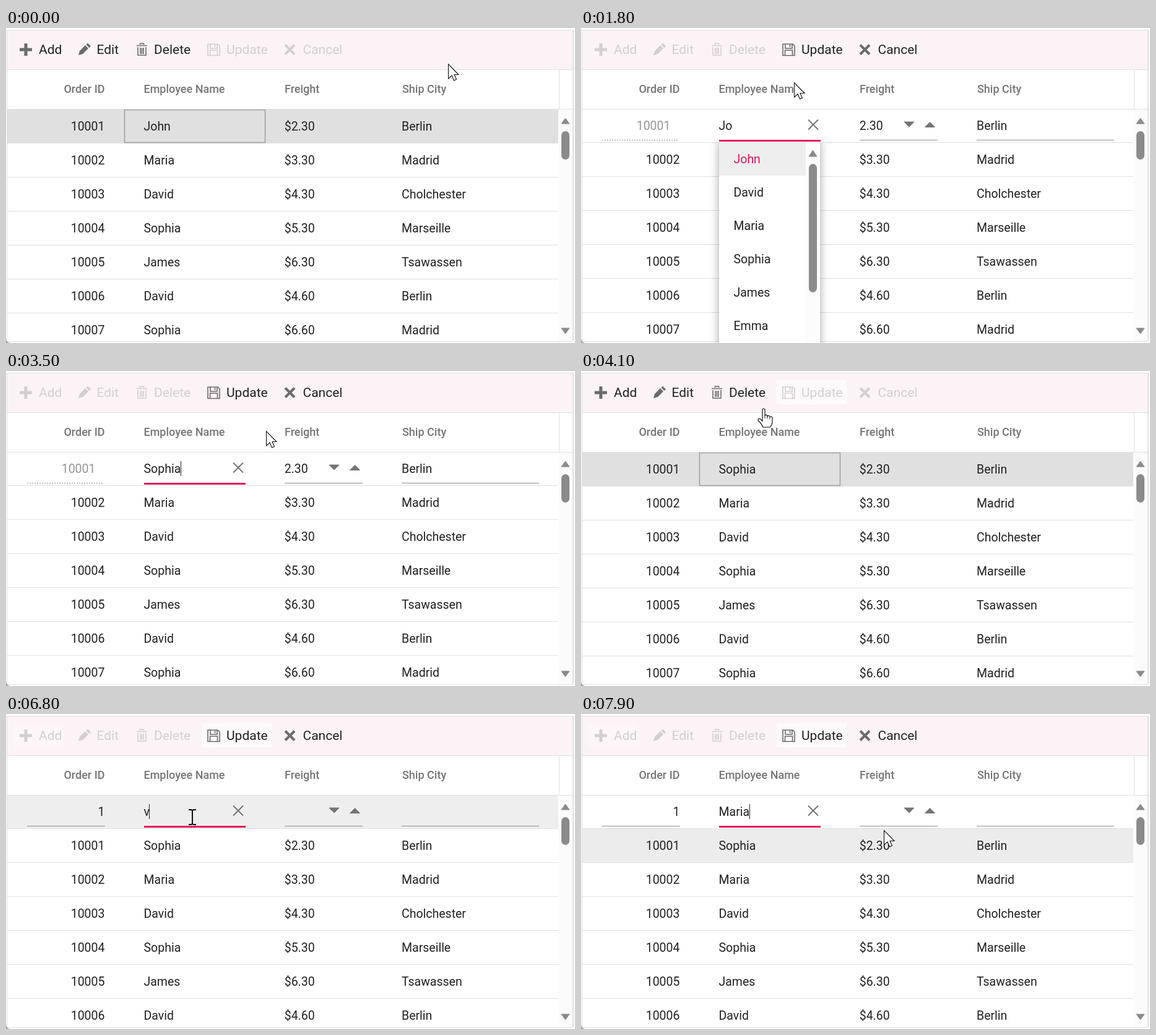
An HTML page with a canvas that plays this animation: 919x510 px, repeating every 8 s.

```html
<!DOCTYPE html>
<html lang="en">
<head>
<meta charset="utf-8">
<title>Editable grid</title>
<style>
html, body { margin: 0; width: 100%; height: 100%; overflow: hidden; background: #fff; }
canvas { display: block; }
</style>
</head>
<body>
<canvas id="stage" width="919" height="510"></canvas>
<script>
const ctx = document.getElementById('stage').getContext('2d');
const LOOP = 8000;
const PINK = '#e3165b', INK = '#212121', ICON = '#6b6b6b', OFF = '#d3cfd1', LINE = '#e0e0e0', THUMB = '#8b8b8b';
const COLUMN = { id: 159.5, name: 222.5, freight: 449.7, city: 639 };
const NAMES = ['John', 'Maria', 'David', 'Sophia', 'James', 'David', 'Sophia'];
const PRICES = ['2.30', '3.30', '4.30', '5.30', '6.30', '4.60', '6.60'];
const CITIES = ['Berlin', 'Madrid', 'Cholchester', 'Marseille', 'Tsawassen', 'Berlin', 'Madrid'];
const OPTIONS = ['John', 'David', 'Maria', 'Sophia', 'James', 'Emma'];

// Pointer stops: time, hotspot x and y, shape from then on
const POINTER = [
  [0, 714, 58, 'arrow'], [100, 640, 72, 'arrow'], [300, 330, 140, 'arrow'], [500, 177, 171, 'arrow'],
  [700, 177, 171, 'arrow'], [1000, 310, 155, 'beam'], [1100, 310, 155, 'beam'], [1200, 344, 88, 'arrow'],
  [2500, 344, 88, 'arrow'], [2600, 335, 190, 'hand'], [2800, 306, 335, 'hand'], [3000, 303, 366, 'hand'],
  [3200, 303, 366, 'hand'], [3300, 315, 330, 'arrow'], [3500, 420, 97, 'arrow'], [3600, 396, 60, 'arrow'],
  [3700, 380, 46, 'hand'], [4000, 380, 46, 'hand'], [4200, 210, 76, 'arrow'], [4400, 46, 50, 'hand'],
  [4600, 44, 48, 'arrow'], [4700, 44, 48, 'arrow'], [4900, 88, 97, 'arrow'], [5300, 88, 97, 'arrow'],
  [5500, 200, 76, 'arrow'], [5700, 301, 167, 'beam'], [6900, 301, 167, 'beam'], [7000, 302, 200, 'hand'],
  [7300, 306, 332, 'hand'], [7700, 306, 332, 'hand'], [7800, 400, 255, 'arrow'], [7900, 489, 188, 'arrow']
];
const EDIT_TEXT = [[700, 'John'], [1600, 'Joh'], [1800, 'Jo'], [2000, 'J'], [3200, 'Sophia'],
  [4600, ''], [6800, 'v'], [7700, 'Maria']];

const within = (t, a, b) => t >= a && t < b;
const latest = (steps, t) => steps.filter(s => s[0] <= t).pop();

function pointerAt(t) {
  const i = POINTER.filter(p => p[0] <= t).length - 1;
  const a = POINTER[i], b = POINTER[i + 1] || a;
  const k = b === a ? 0 : (t - a[0]) / (b[0] - a[0]);
  return { x: Math.round(a[1] + (b[1] - a[1]) * k), y: Math.round(a[2] + (b[2] - a[2]) * k), shape: a[3] };
}

function rect(x, y, w, h, color) {
  ctx.fillStyle = color;
  ctx.fillRect(x, y, w, h);
}

function pill(x, y, w, h, color, r = w / 2) {
  ctx.fillStyle = color;
  ctx.beginPath();
  ctx.roundRect(x, y, w, h, r);
  ctx.fill();
}

function text(s, x, y, color = INK, size = 19.5, weight = 400, align = 'left') {
  ctx.font = `${weight} ${size}px Roboto, sans-serif`;
  ctx.textAlign = align;
  ctx.fillStyle = color;
  ctx.fillText(s, x, y);
}

function shape(d, fill, stroke, width = 1, x = 0, y = 0) {
  const path = new Path2D(d);
  ctx.save();
  ctx.translate(x, y);
  if (fill) { ctx.fillStyle = fill; ctx.fill(path); }
  if (stroke) { ctx.strokeStyle = stroke; ctx.lineWidth = width; ctx.stroke(path); }
  ctx.restore();
}

// Triangle with its flat side at y and its tip at y + h
function triangle(x, y, w, h, color) {
  shape(`M${x} ${y}h${w}l${-w / 2} ${h}z`, color, color, 1);
}

function toolbar(t, busy) {
  rect(2, 4, 913, 63, '#fcf3f6');
  rect(0, 3, 916, 1, LINE);
  rect(2, 67, 913, 1, LINE);
  if (t >= 3700) pill(316, 15, 113, 39, '#fefafc', 3);
  if (t >= 4300) pill(12, 15, 80, 39, '#fdf6f8', 3);
  const a = busy ? OFF : ICON, b = busy ? ICON : OFF;
  const labelA = busy ? OFF : INK, labelB = busy ? INK : OFF;
  shape('M32 25v20M22 35h20', null, a, 5);
  shape('M117 44l2-7 9-9 5 5-9 9zM129.500 27l2.500-2.500 5 5-2.500 2.500z', a);
  shape('M211 28.500h17M216.500 27v-2h6v2M213 31v13h13v-13M217 32v10M219.500 32v10M222 32v10', null, a, 1.6);
  shape('M326 26h16l3 3v15.500h-19zM330 26v7h11v-7M329.500 44v-8h12v8M337.500 27v4', null, b, 1.6);
  shape('M451 27.500l15 15M466 27.500l-15 15', null, b, 4);
  [['Add', 53], ['Edit', 146.5], ['Delete', 239]].forEach(([s, x]) => text(s, x, 42, labelA, 21));
  [['Update', 356], ['Cancel', 479.5]].forEach(([s, x]) => text(s, x, 42, labelB, 21));
}

function header() {
  text('Order ID', 159.5, 105, '#757575', 18, 500, 'right');
  text('Employee Name', 222.5, 105, '#757575', 18, 500);
  text('Freight', 450, 105, '#757575', 18, 500);
  text('Ship City', 640, 105, '#757575', 18, 500);
  rect(893, 68, 1, 63, LINE);
  rect(2, 131, 913, 1, LINE);
}

function dataRow(i, top, name, fill) {
  if (fill) rect(2, top, 890, 54, fill);
  rect(2, top + 54, 890, 1, LINE);
  const y = top + 34;
  text(String(10001 + i), COLUMN.id, y, INK, 19.5, 400, 'right');
  text(name, COLUMN.name, y);
  text('$' + PRICES[i], COLUMN.freight, y);
  text(CITIES[i], COLUMN.city, y);
}

function focusLine(x, w, progress) {
  rect(x + w * (1 - progress) / 2, 181, w * progress, 3, PINK);
}

function editRow(t, adding, hovered) {
  if (hovered) rect(2, 132, 890, 53, '#eee');
  rect(2, 185, 890, 1, LINE);
  [[223, 164], [450, 126], [639, 222]].forEach(([x, w]) => rect(x, 181, w, 1, '#8e8e8e'));
  triangle(522, 152, 16, 8, '#757575');
  triangle(555.5, 160.5, 16, -8, '#757575');

  const nameFocused = !adding || t >= 5800;
  const progress = Math.min(1, (t - (adding ? (nameFocused ? 5700 : 4600) : 600)) / 200);
  if (adding) {
    rect(34, 181, 126, 1, '#8e8e8e');
    if (t >= 5300) text('1', COLUMN.id, 165, INK, 19.5, 400, 'right');
    if (!nameFocused) focusLine(34, 126, progress);
    if (within(t, 4600, 5100) || within(t, 5300, 5800)) rect(158, 147, 2, 24, INK);
  } else {
    text('10001', 144.5, 165, '#949494', 19.5, 400, 'right');
    for (let x = 34; x < 157; x += 4) rect(x, 181, 2, 1, '#8e8e8e');
    text(PRICES[0], COLUMN.freight, 165);
    text(CITIES[0], COLUMN.city, 165);
  }

  const value = latest(EDIT_TEXT, t)[1];
  if (nameFocused) focusLine(223, 164, progress);
  text(value, COLUMN.name, 165);
  const caretAt = Math.floor(COLUMN.name + ctx.measureText(value).width);
  if (value) shape('M367 148.500l16 16M383 148.500l-16 16', null, '#757575', 2);
  if (within(t, 700, 1400) || within(t, 2300, 3900) || within(t, 5800, 6300) || t >= 6800) rect(caretAt, 146, 1, 24, INK);
}

function popup(adding, pointer) {
  ctx.save();
  ctx.beginPath();
  ctx.rect(200, 185, 210, 325);
  ctx.clip();
  ctx.shadowColor = 'rgba(0,0,0,.35)';
  ctx.shadowBlur = 14;
  ctx.shadowOffsetY = 4;
  rect(223, 178, 163, 345, '#fff');
  ctx.restore();
  rect(363, 185, 23, 325, '#fcfcfc');
  OPTIONS.forEach((name, i) => {
    const top = 185 + 54 * i, chosen = !adding && i === 0;
    const hovered = pointer.y >= top && pointer.y < top + 54;
    if (chosen || hovered) rect(223, top, 140, 54, '#eee');
    text(name, 246.5, top + 34, chosen ? PINK : INK);
  });
  triangle(368, 208, 13, -10, THUMB);
  pill(368, 220, 13, 208, THUMB);
}

function scrollbar(adding) {
  rect(893, 132, 22, 375, '#fbfbfb');
  triangle(897, 155, 13, -9, THUMB);
  pill(897, 167, 13, adding ? 45 : 46, THUMB);
  triangle(897, 486, 13, 9, THUMB);
}

function drawPointer({ x, y, shape: kind }) {
  if (kind === 'arrow') {
    shape('M.5.5v23.500l5.500-5 3.500 8 4-1.700-3.500-7.800h7z', '#fff', '#111', 1.1, x, y);
  } else if (kind === 'beam') {
    shape('M-6-12h4l2 1 2-1h4M0-11v22M-6 12h4l2-1 2 1h4', null, '#111', 2, x, y);
  } else {
    shape('M-2 2q0-2 2-2t2 2v9q3-2 4 1 3-2 4 1 4-1 4 2v6q0 5-4 9h-11q-2-5-8-11 0-5 4-2l3 3z', '#fff', '#111', 1.2, x, y);
    shape('M2 11v5M6 12v4M10 13v4', null, '#111', 1, x, y);
  }
}

function draw(t) {
  const editing = within(t, 700, 3900), adding = t >= 4600, busy = editing || adding;
  const open = within(t, 1800, 3300) || within(t, 6900, 7700);
  const pointer = pointerAt(t);
  const hoverTop = top => !open && pointer.y >= top && pointer.y < top + 54;

  rect(0, 0, 919, 510, '#fff');
  toolbar(t, busy);
  header();
  ctx.save();
  ctx.beginPath();
  ctx.rect(0, 132, 919, 375);
  ctx.clip();
  for (let i = editing ? 1 : 0; i < NAMES.length; i++) {
    const top = adding ? 186 + 55 * i : 132 + 55 * i - (editing ? 1 : 0);
    const selected = !busy && i === 0;
    const name = i === 0 && t >= 3900 ? 'Sophia' : NAMES[i];
    dataRow(i, top, name, selected ? LINE : hoverTop(top) ? '#ececec' : null);
  }
  if (busy) editRow(t, adding, hoverTop(132));
  else shape('M191.500 132.500h227v53h-227z', null, '#9e9e9e', 1.5);
  scrollbar(adding);
  ctx.restore();

  rect(1, 3, 1, 504, LINE);
  rect(915, 3, 2, 504, LINE);
  rect(2, 507, 913, 1, LINE);
  shape('M0 503q1 6 7 7h-7z', '#a5a5a5');
  if (open) popup(adding, pointer);
  drawPointer(pointer);
}

function tick(now) {
  draw(Math.floor(now % LOOP / 100) * 100);
  requestAnimationFrame(tick);
}
requestAnimationFrame(tick);
</script>
</body>
</html>
```
